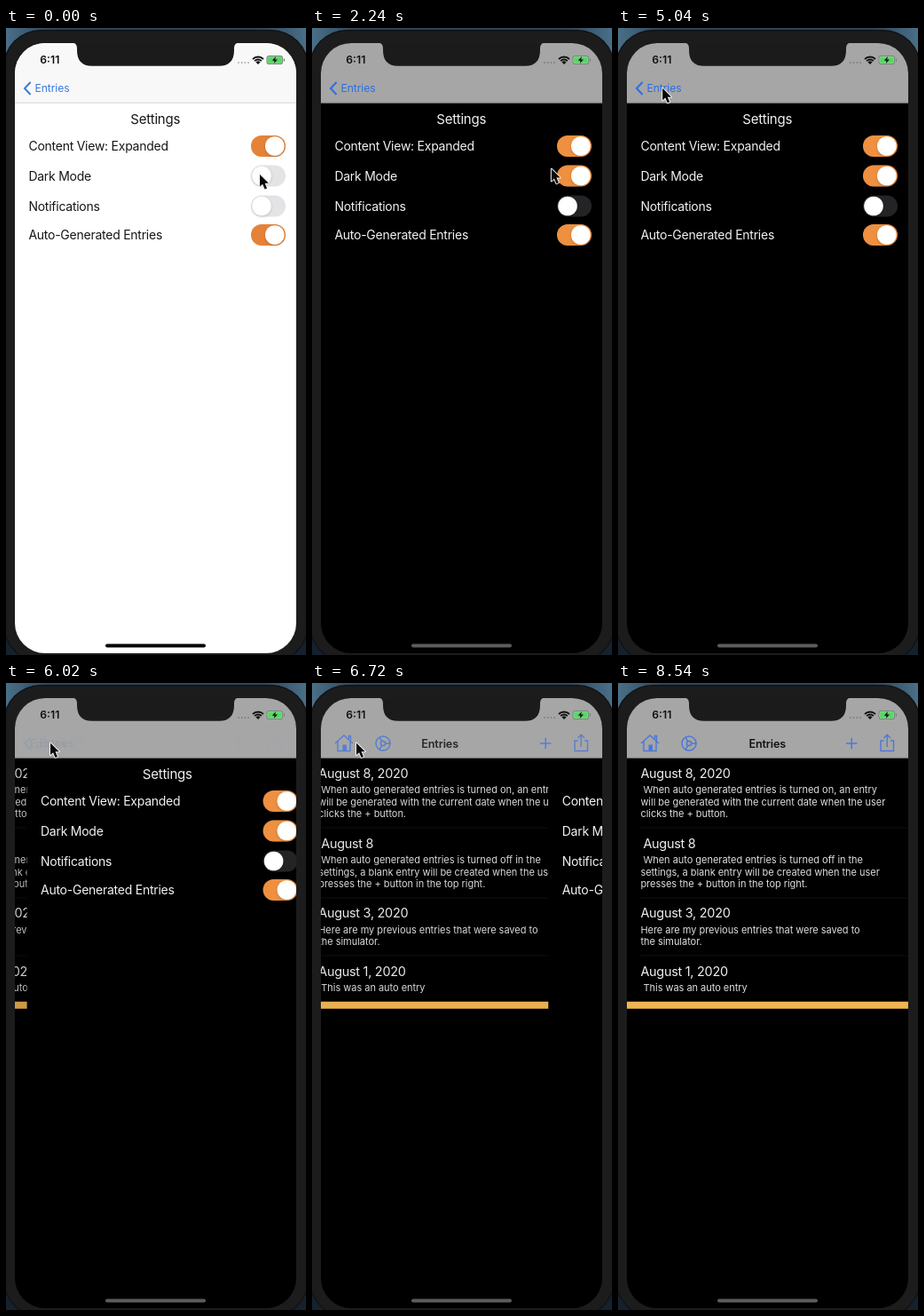
An HTML page with a canvas for the animation above (8.75 s loop, 338 px wide and 706 px high).

```html
<!DOCTYPE html>
<html lang="en">
<head>
<meta charset="utf-8">
<title>Settings and entries</title>
<style>
  html, body { margin: 0; width: 100%; height: 100%; overflow: hidden; background: #1b1b1c; }
  canvas { display: block; width: 338px; height: 706px; }
</style>
</head>
<body>
<canvas id="stage"></canvas>
<script>
const W = 338, H = 706, LOOP = 8750;
const SCREEN = { x: 10, y: 17, w: 317, h: 687 };
const NAV_BOTTOM = 84.5;
const TEXT_X = 25.4;
const DARK_AT = 280;
const CURSOR_GONE = 7210;

const canvas = document.getElementById('stage');
const ratio = window.devicePixelRatio || 1;
canvas.width = W * ratio;
canvas.height = H * ratio;
const ctx = canvas.getContext('2d');

const LIGHT = { page: '#fff', nav: '#f8f8f8', line: '#c9c9cb', text: '#161616', link: '#3b7bdc',
  on: '#e58238', off: '#e4e4e6', home: '#050505' };
const DARK = { page: '#000', nav: '#a6a6a6', line: '#8a8a8a', text: '#f2f2f2', link: '#2c6fe2',
  on: '#ee9040', off: '#242426', home: '#5c5c5c' };

const ROWS = [
  ['Content View: Expanded', 133],
  ['Dark Mode', 166.5],
  ['Notifications', 200.5],
  ['Auto-Generated Entries', 233]
];

const ENTRIES = [
  { title: 'August 8, 2020', x: TEXT_X, y: 106.5, lines: [
    ' When auto generated entries is turned on, an entry',
    'will be generated with the current date when the user',
    'clicks the + button.'] },
  { title: 'August 8', x: TEXT_X + 3, y: 185.5, lines: [
    ' When auto generated entries is turned off in the',
    'settings, a blank entry will be created when the user',
    'presses the + button in the top right.'] },
  { title: 'August 3, 2020', x: TEXT_X, y: 264, lines: [
    'Here are my previous entries that were saved to',
    'the simulator.'] },
  { title: 'August 1, 2020', x: TEXT_X, y: 329.5, lines: [' This was an auto entry'] }
];

const clamp = v => Math.max(0, Math.min(1, v));
const span = (t, a, b) => clamp((t - a) / (b - a));
const smooth = v => v * v * (3 - 2 * v);
const mix = (a, b, p) => a + (b - a) * p;

// Critically damped pop transition, 0 to 1
function popProgress(t) {
  const a = Math.max(0, t - 5871) * 0.005114;
  return 1 - (1 + a + a * a / 2) * Math.exp(-a);
}

function text(str, x, y, size, color, { weight = 400, spacing = -0.25, align = 'left' } = {}) {
  ctx.font = `${weight} ${size}px Inter, Roboto, sans-serif`;
  ctx.letterSpacing = spacing + 'px';
  ctx.textAlign = align;
  ctx.fillStyle = color;
  ctx.fillText(str, x, y);
}

function box(x, y, w, h, r, color) {
  ctx.beginPath();
  ctx.roundRect(x, y, w, h, r);
  ctx.fillStyle = color;
  ctx.fill();
}

function disc(x, y, r, color) {
  ctx.beginPath();
  ctx.arc(x, y, r, 0, Math.PI * 2);
  ctx.fillStyle = color;
  ctx.fill();
}

function stroke(path, color, width) {
  ctx.strokeStyle = color;
  ctx.lineWidth = width;
  ctx.stroke(new Path2D(path));
}

function clipped(x, y, w, h, draw) {
  ctx.save();
  ctx.beginPath();
  ctx.rect(x, y, w, h);
  ctx.clip();
  draw();
  ctx.restore();
}

function faded(alpha, draw) {
  if (alpha <= 0) return;
  ctx.save();
  ctx.globalAlpha = alpha;
  draw();
  ctx.restore();
}

function toggle(y, on, theme) {
  box(276, y - 12, 39, 24, 12, theme.off);
  faded(on, () => box(276, y - 12, 39, 24, 12, theme.on));
  ctx.save();
  ctx.shadowColor = 'rgba(0,0,0,.18)';
  ctx.shadowBlur = 3 * ratio;
  ctx.shadowOffsetY = ratio;
  disc(mix(288, 302.8, on), y, 10.8, '#fff');
  ctx.restore();
}

function settingsPage(t, theme) {
  text('Settings', 168.2, 107.5, 15, theme.text, { align: 'center' });
  const states = [1, smooth(span(t, DARK_AT, 500)), 0, 1];
  ROWS.forEach(([label, y], i) => {
    text(label, TEXT_X, y + 5.2, 14, theme.text);
    toggle(y, states[i], theme);
  });
}

function entriesPage() {
  for (const { title, x, y, lines } of ENTRIES) {
    text(title, x, y, 14.4, '#f0f0f0');
    lines.forEach((line, i) =>
      text(line, TEXT_X, y + 17.7 + i * 13.5, 11, '#dedede', { spacing: -0.03 }));
  }
  for (const y of [163, 242, 307]) box(25, y - 0.5, 302, 1, 0, '#101010');
  box(SCREEN.x - 100, 358.7, SCREEN.w + 100, 8, 0, '#efb550');
}

function navIcons(color) {
  // House
  stroke('M26 68 L36 59 L46 68 M29 66 V76.5 H43 V66 M41.5 63 V59.5 H43.5 V65', color, 1.4);
  box(34.5, 69.5, 4.5, 7, 0, color);
  // Gear
  ctx.beginPath();
  ctx.arc(80, 68, 8, 0, Math.PI * 2);
  ctx.moveTo(82.6, 68);
  ctx.arc(80, 68, 2.6, 0, Math.PI * 2);
  for (const a of [0, 2.09, 4.19]) {
    ctx.moveTo(80 + 2.6 * Math.cos(a), 68 + 2.6 * Math.sin(a));
    ctx.lineTo(80 + 8 * Math.cos(a), 68 + 8 * Math.sin(a));
  }
  ctx.strokeStyle = color;
  ctx.lineWidth = 1.5;
  ctx.stroke();
  // Plus and share
  stroke('M257 68 H269.5 M263.2 61.8 V74.2', color, 1.5);
  stroke('M299.5 65 H296 V76.5 H310.5 V65 H307 M303.2 72 V58.5 M299.5 62 L303.2 58.3 L307 62', color, 1.4);
}

function navBar(t, p, theme) {
  box(SCREEN.x, 0, SCREEN.w, NAV_BOTTOM, 0, theme.nav);
  box(SCREEN.x, NAV_BOTTOM - 0.7, SCREEN.w, 0.7, 0, theme.line);
  const back = t < 5740 ? 1 : 0.9 * (1 - span(t, 5740, 6060));
  faded(back, () => {
    stroke('M27.6 61 L21 68 L27.6 75', theme.link, 2);
    text('Entries', 32.5 + 116 * p, 72.4, 12.2, theme.link, { spacing: -0.1 });
  });
  if (p <= 0) return;
  faded(clamp(p * 1.05), () => {
    navIcons('#4a78d8');
    text('Entries', mix(42, 168.3, p), 72.6, 12.6, '#111', { weight: 600, spacing: -0.1, align: 'center' });
  });
}

function statusBar() {
  text('6:11', 49.3, 40.4, 12.2, '#111', { weight: 600, spacing: 0, align: 'center' });
  for (let i = 0; i < 4; i++) disc(262 + i * 3.7, 39, 1, 'rgba(70,70,70,.4)');

  // Wi-Fi fan
  ctx.strokeStyle = '#111';
  ctx.lineWidth = 1.8;
  for (const r of [9, 6]) {
    ctx.beginPath();
    ctx.arc(284, 41, r - 0.5, -Math.PI * 0.75, -Math.PI * 0.25);
    ctx.stroke();
  }
  ctx.beginPath();
  ctx.moveTo(284, 41);
  ctx.arc(284, 41, 3.6, -Math.PI * 0.75, -Math.PI * 0.25);
  ctx.fillStyle = '#111';
  ctx.fill();

  // Charging battery
  box(293.5, 31, 18.5, 10, 2.8, '#71887a');
  box(294.4, 31.9, 16.7, 8.2, 2, '#9bd39d');
  box(295.2, 32.7, 15.1, 6.6, 1.3, '#57d765');
  box(312.7, 34.3, 1.3, 3.4, 0.6, '#71887a');
  ctx.fillStyle = '#111';
  ctx.fill(new Path2D('M304 32 L299.8 36.7 H302.5 L301.8 40 L306 35.4 H303.2 Z'));
}

function phoneBody() {
  const top = ctx.createLinearGradient(0, 0, W, 0);
  top.addColorStop(0, '#4a6f89');
  top.addColorStop(0.15, '#2d4559');
  top.addColorStop(0.85, '#2d4559');
  top.addColorStop(1, '#4a6f89');
  box(0, 0, W, 50, 0, top);
  box(0, 50, W, H - 50, 0, '#15212d');
  box(-3, 2, W + 6, H + 6, 42, '#101214');
  box(-1.5, 3.5, W + 3, H + 3, 40, '#1c1c1d');
}

function notch() {
  ctx.fillStyle = '#1b1b1c';
  ctx.fill(new Path2D('M74 16 Q80 17 80 23 V25 Q80 42.8 97 42.8 H240 Q257 42.8 257 25 V23 Q257 17 263 16 Z'));
}

function cursor(t) {
  if (t >= CURSOR_GONE) return;
  const move = smooth(span(t, 1960, 3700));
  const settle = smooth(span(t, 4060, 5180));
  const x = mix(286, 54.5, move) - 4.5 * settle;
  const y = mix(165, 76, move) - 8.5 * settle;
  ctx.save();
  ctx.translate(x, y);
  const arrow = new Path2D('M0 0 V13.6 L3.1 10.7 L5.6 16.4 L8 15.4 L5.6 9.8 H9.8 Z');
  ctx.lineJoin = 'round';
  ctx.strokeStyle = '#f4f4f4';
  ctx.lineWidth = 2;
  ctx.stroke(arrow);
  ctx.fillStyle = '#080808';
  ctx.fill(arrow);
  ctx.restore();
}

function draw(t) {
  const theme = t < DARK_AT ? LIGHT : DARK;
  const p = popProgress(t);
  const edge = SCREEN.w * p;
  ctx.setTransform(ratio, 0, 0, ratio, 0, 0);
  phoneBody();

  ctx.save();
  ctx.beginPath();
  ctx.roundRect(SCREEN.x, SCREEN.y, SCREEN.w, SCREEN.h, 34);
  ctx.clip();
  box(0, 0, W, H, 0, theme.page);
  if (p > 0) {
    clipped(SCREEN.x, NAV_BOTTOM, edge, H, () => {
      ctx.translate(-95 * (1 - p), 0);
      entriesPage();
    });
    box(SCREEN.x, NAV_BOTTOM, edge, H, 0, `rgba(0,0,0,${0.15 * (1 - p)})`);
  }
  clipped(SCREEN.x + edge, NAV_BOTTOM, SCREEN.w, H, () => {
    ctx.translate(edge, 0);
    settingsPage(t, theme);
  });
  navBar(t, p, theme);
  statusBar();
  notch();
  box(112, 693.5, 113, 4, 2, theme.home);
  ctx.restore();

  cursor(t);
}

const start = performance.now();
function tick() {
  draw((performance.now() - start) % LOOP);
  requestAnimationFrame(tick);
}
tick();
</script>
</body>
</html>
```
